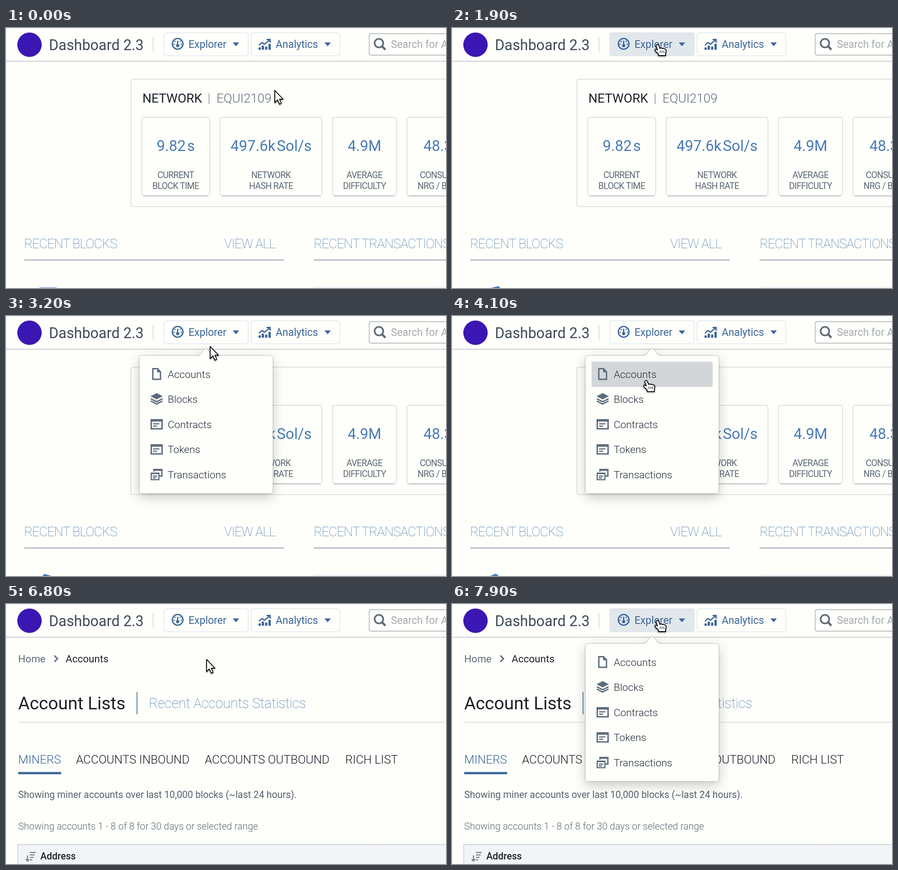
Animation, 974 px wide and 575 px high, one loop 8 s. Source, as an HTML page:

```html
<!DOCTYPE html>
<html lang="en">
<head>
<meta charset="utf-8">
<title>Dashboard</title>
<style>
  html, body { margin: 0; width: 100%; height: 100%; overflow: hidden; background: #fefffb; }
  svg { display: block; width: 974px; height: 575px; font-family: Roboto, sans-serif; }
  .line { fill: none; stroke: #d3d7da; stroke-width: 1.5; }
  .button { fill: #fefffb; stroke: #dfe6ee; stroke-width: 1.5; }
  .button.hover { fill: #e2e7ec; stroke: #dbe2e9; }
  .blue { fill: #3b6699; }
  .slate { fill: #5c6b7b; }
  .nav { font-size: 23px; }
  .value { font-size: 33px; fill: #477ab5; }
  .label { font-size: 19.5px; letter-spacing: -.65px; fill: #5c6773; }
  .section { font-size: 29px; font-weight: 200; letter-spacing: -1.1px; fill: #4a75a6; }
  .mid { text-anchor: middle; }
  .tab { font-size: 26px; font-weight: 300; fill: #1c2127; }
  .menu { font-size: 22.8px; font-weight: 300; fill: #1f2831; }
  #menu { filter: drop-shadow(0 0 1px #10161a80) drop-shadow(0 8px 13px #10161a3c); }
  #cursor { filter: drop-shadow(0 2px 1.5px #0006); }
  #cursor path { fill: #fff; stroke: #000; stroke-width: 1.8; stroke-linejoin: round; }
</style>
</head>
<body>
<svg viewBox="0 0 974 575">
  <defs>
    <g id="form" fill="none" stroke="#5c6b7b" stroke-width="3">
      <path d="M1.5 2.500h24v20h-24z"/>
      <path d="M1 4h25" stroke-width="5"/>
      <path d="M5.500 11.500h14M5.500 16.500h9" stroke-width="2.600"/>
    </g>
  </defs>
  <rect width="974" height="575" fill="#fefffb"/>

  <g id="home">
    <path class="line" d="M980 113H282q-5.500 0-5.500 5.500V389q0 6 6 6H980"/>
    <text x="302" y="165" font-size="28" fill="#1c2127">NETWORK</text>
    <path d="M449.500 145v23" stroke="#8a929a" stroke-width="1.600"/>
    <text x="466" y="165" font-size="27.700" font-weight="300" fill="#5f6b77">EQUI2109</text>
    <g id="cards"></g>
    <g class="section">
      <text x="40" y="487">RECENT BLOCKS</text>
      <text x="483" y="487">VIEW ALL</text>
      <text x="681" y="487">RECENT TRANSACTIONS</text>
    </g>
    <path d="M40 513H615M681 513H974" stroke="#7e8893" stroke-width="1.600"/>
    <path d="M681 571H974V575H681z" fill="#f1f5f7"/>
    <path id="block" fill="#477ab5"/>
  </g>

  <g id="accounts">
    <g font-size="22.500">
      <text x="27" y="129" fill="#5f6b77">Home</text>
      <text x="132" y="129" fill="#1c2127">Accounts</text>
    </g>
    <path d="M107 114l7 7-7 7" fill="none" stroke="#5c6b7b" stroke-width="3"/>
    <text x="27" y="233" font-size="39" fill="#1c2127">Account Lists</text>
    <path d="M290 195V244" stroke="#4a6f9c" stroke-width="1.800"/>
    <text x="316" y="230" font-size="31" font-weight="200" letter-spacing="-.4" fill="#4a75a6">Recent Accounts Statistics</text>
    <path class="line" d="M27 261.500H974"/>
    <g class="tab">
      <text x="27" y="353" class="blue">MINERS</text>
      <text x="155" y="353">ACCOUNTS INBOUND</text>
      <text x="440" y="353">ACCOUNTS OUTBOUND</text>
      <text x="751" y="353">RICH LIST</text>
    </g>
    <path class="blue" d="M27 371.500H122V376.500H27z"/>
    <g font-size="21.200" fill="#5f6b77">
      <text x="27" y="429" fill="#55616d">Showing miner accounts over last 10,000 blocks (~last 24 hours).</text>
      <text x="27" y="499" font-weight="300">Showing accounts 1 - 8 of 8 for 30 days or selected range</text>
      <path d="M974 532H26V575" fill="#f2f5f6"/>
      <path d="M26 575H974V532z" fill="#f2f5f6"/>
      <path d="M974 532H26V575" fill="none" stroke="#c3cacf" stroke-width="1.500"/>
      <text x="76" y="565" font-weight="500" fill="#1c2127">Address</text>
    </g>
    <path d="M47.500 556V569M43.500 564l4 4.500 4-4.500M53 549.500H66M53 555H63.500M53 560.500H61M53 566H58" fill="none" stroke="#7b8793" stroke-width="2.600"/>
  </g>

  <g id="header">
    <path d="M0 73.500H974" stroke="#babec0" stroke-width="1.600"/>
    <path d="M.5 0V575M0 .5H974" stroke="#eceeed"/>
    <circle cx="52" cy="37" r="27" fill="#3a17b2"/>
    <text x="95" y="48.500" font-size="32.400" fill="#404b57">Dashboard 2.3</text>
    <path d="M325.500 20V52" stroke="#d3d8dc" stroke-width="1.600"/>
    <rect id="explorer" class="button" x="349.500" y="10.500" width="186.500" height="51" rx="5"/>
    <rect class="button" x="542.500" y="10.500" width="196.500" height="51" rx="5"/>
    <g class="nav blue">
      <text x="404" y="43.500">Explorer</text>
      <text x="597" y="43.500">Analytics</text>
    </g>
    <path class="blue" d="M502 32h14l-7 8.500zM705 32h14l-7 8.500z"/>
    <g fill="none" stroke="#3b6699" stroke-width="2.800">
      <circle cx="380" cy="35" r="11.800"/>
      <path d="M380 28v9"/>
      <path d="M372 36h.1M374.500 29.500h.1M385.500 29.500h.1M388 36h.1" stroke-linecap="round"/>
      <path d="M560 38l7-6 5 4 12-10M577 25.500h7.500v7"/>
    </g>
    <circle class="blue" cx="380" cy="39" r="3.500"/>
    <path class="blue" d="M559 43h5v5h-5zM566 39h5v9h-5zM573.500 41h5v7h-5zM581 35h5v13h-5z"/>
    <path d="M980 12.500H808q-4 0-4 4V56q0 4 4 4H980" fill="none" stroke="#b9bec2" stroke-width="1.800"/>
    <circle cx="825.500" cy="33.500" r="9.500" fill="none" stroke="#5c6b7b" stroke-width="3.600"/>
    <path d="M832.500 40.500l6 6" stroke="#5c6b7b" stroke-width="4.600" stroke-linecap="round"/>
    <text class="nav" x="852" y="43.500" fill="#a5abb0">Search for A</text>
  </g>

  <g id="menu">
    <path fill="#fefffb" d="M300 88H424q4 0 7-3L439 74q3.500-4 7 0L455 85q3 3 7 3H585.500q5 0 5 5V387q0 5-5 5H300.500q-5 0-5-5V93q0-5 5-5z"/>
    <path id="row" d="M311 101H575q2 0 2 2V155q0 2-2 2H311q-2 0-2-2V103q0-2 2-2z"/>
    <g class="menu" id="items"></g>
    <path d="M325 116.500h10.500l6.500 7V140H325z" fill="none" stroke="#5c6b7b" stroke-width="3"/>
    <path class="slate" d="M334.500 116v8.500H343z"/>
    <path class="slate" d="M320 177.500l13.500-7 13.500 7-13.500 7z"/>
    <path d="M320.500 183l13 6.500 13-6.500M320.500 188l13 6.500 13-6.500" fill="none" stroke="#5c6b7b" stroke-width="3"/>
    <use href="#form" x="320" y="227"/>
    <use href="#form" x="320" y="282.500"/>
    <path d="M327.500 344V339.500H345V354H340" fill="none" stroke="#5c6b7b" stroke-width="3"/>
    <path d="M327 340.500h19" stroke="#5c6b7b" stroke-width="4"/>
    <path d="M321.500 347.500h17v14.500h-17zM321 348.500h18M325 354h10M325 358h7" fill="none" stroke="#5c6b7b" stroke-width="2.600"/>
  </g>

  <g id="cursor">
    <path id="arrow" d="M1 1V28L7 22 11.500 31.500 15.500 29.500 11.500 20.500H19.500z"/>
    <g id="hand">
      <path d="M-3.500 3Q-1-2 2.500 2L5 9Q8 7 10 9.500Q13 7.500 15 10.500Q18.500 9.500 19 14L18 20V25H2V21.500L-4.500 15.500Q-7.500 11-4 10.500L0 12.500z"/>
      <path d="M6 14v5M10 14v5M14 14v5" style="stroke-width:1.200"/>
    </g>
  </g>
</svg>
<script>
const $ = id => document.getElementById(id);
const LOOP = 8000, PAGE_SWITCH = 4300, PRESS = 3950;

// x, width, number, unit, two label lines
$('cards').innerHTML = [
  [300.5, 150.5, '9.82', 's', 'CURRENT', 'BLOCK TIME'],
  [474, 225.5, '497.6k', 'Sol/s', 'NETWORK', 'HASH RATE'],
  [722.5, 142, '4.9', 'M', 'AVERAGE', 'DIFFICULTY'],
  [887.5, 157, '48.3', 'k', 'CONSUMED', 'NRG / BLOCK'],
].map(([x, w, value, unit, a, b]) => {
  const mid = x + w / 2;
  const gap = unit === 'M' ? 0 : 3;
  return `<rect class="line" x="${x}" y="197.5" width="${w}" height="173.5" rx="5"/>
    <path d="M${x + 4} 371.5h${w - 8}" stroke="#aeb4b9" stroke-width="1.5"/>
    <text class="value mid" x="${mid}" y="271.500">${value}<tspan dx="${gap}">${unit}</tspan></text>
    <text class="label mid" x="${mid}" y="331.500">${a}</text>
    <text class="label mid" x="${mid}" y="356">${b}</text>`;
}).join('');

$('items').innerHTML = ['Accounts', 'Blocks', 'Contracts', 'Tokens', 'Transactions']
  .map((name, i) => `<text x="358" y="${136.5 + i * 55.5}">${name}</text>`).join('');

const pointerPath = [
  [200, 594, 137], [700, 518, 106], [1100, 455, 70], [1200, 454, 64], [1400, 455, 36],
  [3000, 455, 36], [3200, 451, 66], [3450, 436, 130], [3700, 430, 142],
  [6700, 430, 143], [6800, 443, 122], [6900, 450, 85], [7000, 453, 52], [7100, 455, 36],
];
const blockTurn = [[0, -45], [1200, -11], [2500, 52], [4100, 98.5], [4500, 110]];

function sample(keys, t) {
  if (t <= keys[0][0]) return keys[0].slice(1);
  const i = keys.findIndex(k => k[0] > t);
  if (i < 0) return keys[keys.length - 1].slice(1);
  const [a, b] = [keys[i - 1], keys[i]];
  const f = (t - a[0]) / (b[0] - a[0]);
  return a.slice(1).map((v, j) => v + (b[j + 1] - v) * f);
}

// cubic-bezier(.54, 1.12, .38, 1.11)
function bounce(x) {
  if (x <= 0) return 0;
  if (x >= 1) return 1;
  const curve = (p, q, s) => 3 * (1 - s) ** 2 * s * p + 3 * (1 - s) * s * s * q + s ** 3;
  let lo = 0, hi = 1;
  for (let i = 0; i < 24; i++) {
    const mid = (lo + hi) / 2;
    if (curve(.54, .38, mid) < x) lo = mid; else hi = mid;
  }
  return curve(1.12, 1.11, lo);
}

function menuScale(t) {
  const grow = start => .3 + .7 * bounce((t - start) / 300);
  if (t > 7400) return grow(7400);
  if (t < 2369 || t >= 4500) return 0;
  return t < 4200 ? grow(2369) : 1 - .7 * bounce((t - 4200) / 300);
}

// back corner and both neighbours of a cube's turning top face
function blockShape(turn) {
  const angle = ((turn + 45) % 90 + 90) % 90 - 45;
  const corners = [-90, 0, 90].map(d => {
    const r = (angle + d) * Math.PI / 180;
    return `${93 + 27 * Math.sin(r)} ${585 - 15.4 * Math.cos(r)}`;
  });
  return `M${corners.join('L')}V620H66z`;
}

const show = (id, on) => $(id).setAttribute('display', on ? 'inline' : 'none');

function draw(now) {
  const t = now % LOOP;
  const [x, y] = sample(pointerPath, t);
  const scale = menuScale(t);
  const onButton = y < 62;
  const onRow = t < PAGE_SWITCH && scale > 0 && y > 101 && y < 157;

  show('home', t < PAGE_SWITCH);
  show('accounts', t >= PAGE_SWITCH);
  $('block').setAttribute('d', blockShape(sample(blockTurn, t)[0]));
  $('explorer').classList.toggle('hover', onButton);

  show('menu', scale > 0);
  $('menu').setAttribute('transform', `translate(442.5 72) scale(${scale}) translate(-442.5 -72)`);
  show('row', onRow);
  $('row').setAttribute('fill', t < PRESS ? '#e4e8eb' : '#d3d6d9');

  $('cursor').setAttribute('transform', `translate(${x} ${y})`);
  show('hand', onButton || onRow);
  show('arrow', !onButton && !onRow);
  requestAnimationFrame(draw);
}
draw(performance.now());
</script>
</body>
</html>
```
